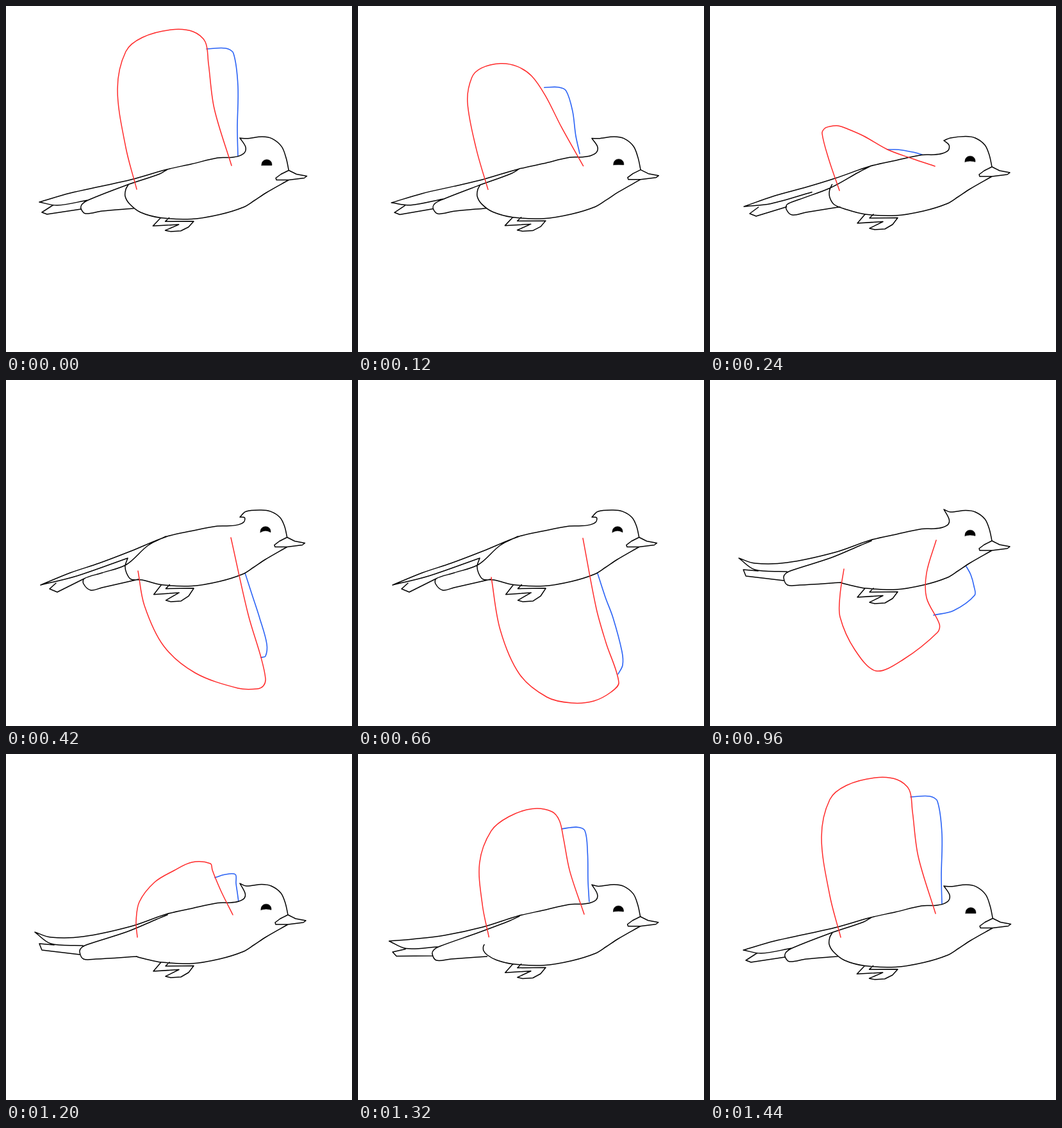
Animation of 540 by 540 pixels, one loop 1500 ms. Source, as an HTML page:

```html
<!DOCTYPE html>
<html lang="en">
<head>
<meta charset="utf-8">
<title>Bird flapping</title>
<style>
html, body { margin: 0; width: 100%; height: 100%; overflow: hidden; background: #fff; }
svg { display: block; width: 100vw; height: 100vh; }
path { fill: none; stroke: #000; stroke-width: 1.5; stroke-linecap: round; stroke-linejoin: round; }
</style>
</head>
<body>
<svg id="stage" viewBox="0 0 540 540"></svg>
<script>
const LOOP = 1500, STEP = 60;

const points = s => s.split(" ").map(p => p.split(",").map(Number));
const shape = parts => Object.fromEntries(Object.entries(parts).map(([k, s]) => [k, points(s)]));

// The body keeps one shape and only bobs, see warp()
const body = shape({
  back: "250,250 290,241 330,232.5 350,232 363,230 372,225 373,217",
  head: "375,206 399,203.5 414,206 429,217 436,233 440,251",
  beak: "440,251 452,257 468,260 464,263 440,266 421,266 420,263 428,257 440,251",
  belly: "440,266 405,286 387,298 370,308.5 333,320 290,327 242,325",
  feet: "242,325 230,339 270,336.5 249,347 257,349 273,348 285,341 293,330.5 249,331 255,325"
});

// sway holds the bob and the height of the crest tip
const down = shape({
  sway: "1,206",
  top: "52,306 100,292 150,281 195,271",
  under: "52,306 80,311 128,303",
  fork: "73,311 56,322 64,325 117,317",
  rear: "210,322 193,309 186,297 187,286 191,279",
  rump: "252,255 240,262 187,280 128,303 119,309 117,316 124,324 150,320 199,316"
});
const up = shape({
  sway: "-1,214",
  top: "54,320 100,301 145,286 195,267",
  under: "54,320 110,306 190,278",
  fork: "78,317 68,326 80,331 122,310",
  rear: "212,312 195,311 188,301 186,290 190,278",
  rump: "250,244 222,258 188,288 150,301 122,310 121,318 132,328 150,324 207,311"
});
const curled = shape({
  sway: "0,202",
  top: "45,278 70,286 120,285 195,269",
  under: "45,278 70,296 120,299",
  fork: "75,298 52,296 56,306 115,313",
  rear: "222,321 210,318 206,317 204,316 203,316",
  rump: "252,251 235,258 190,277 128,297 118,302 115,309 121,320 140,320 204,316"
});
const tailKeys = [[0, down], [60, down], [420, up], [660, up], [960, curled], [1200, curled], [1440, down]];

const wing = (near, far) => shape({ near, far });
const raised = wing(
  "204,286 187,221 174,130 187,71 213,49 258,37 292,40 311,56 316,90 325,160 352,249",
  "313,67 343,66 355,74 362,125 361,190 362,235");
const wingKeys = [
  [0, raised],
  [240, wing(
    "202,288 185,238 175,199 179,191 187,188 200,187 215,192 240,203 277,224 315,238 351,250",
    "277,224 289,224 300,225 311,227 321,229 331,232")],
  [420, wing(
    "206,298 216,352 246,415 295,457 362,481 392,482 402,477 405,466 398,433 378,366 351,246",
    "398,433 405,431 407,412 396,372 384,335 372,298")],
  [660, wing(
    "208,308 222,390 252,459 295,495 333,504 368,501 395,487 407,472 387,410 372,357 351,247",
    "406,459 413,445 412,424 398,371 386,339 373,299")],
  [960, wing(
    "209,295 203,335 203,370 226,421 259,454 302,436 355,394 358,381 338,340 338,301 353,250",
    "349,367 380,360 413,336 412,322 407,304 400,291")],
  [1200, wing(
    "205,286 203,262 208,231 232,200 262,182 290,169 319,171 322,181 327,194 337,217 354,251",
    "326,193 342,188 358,188 359,202 361,216 363,231")],
  [1440, raised]
];

// Hermite blend between poses; swing carries momentum through a key
function poseAt(keys, t, swing) {
  let i = 0;
  while (i < keys.length - 2 && t >= keys[i + 1][0]) i++;
  const [t0, a] = keys[i], [t1, b] = keys[i + 1];
  const span = t1 - t0, k = Math.min(1, (t - t0) / span);
  const ease = k * k * (3 - 2 * k);
  const speed = (n, part, j, c) => {
    const p = keys[n - 1], q = keys[n + 1];
    return p && q ? swing * span * (q[1][part][j][c] - p[1][part][j][c]) / (q[0] - p[0]) : 0;
  };
  const blend = (part, j, c, v) => v + (b[part][j][c] - v) * ease
    + k * (1 - k) * ((1 - k) * speed(i, part, j, c) - k * speed(i + 1, part, j, c));
  return Object.fromEntries(Object.keys(a).map(part =>
    [part, a[part].map((p, j) => p.map((v, c) => blend(part, j, c, v)))]));
}

// The trunk moves fully, crown and toes lag behind
function warp([x, y], bob) {
  const weight = Math.min(1, (y - 200) / 40, (370 - y) / 40);
  return [x + bob * (x - 300) / 110, y + 5.5 * bob * weight];
}

const line = pts => "M" + pts.join("L");
const dist = (a, b) => Math.hypot(a[0] - b[0], a[1] - b[1]);

// Spline through the points, tolerant of uneven spacing
function curve(pts) {
  let d = "M" + pts[0];
  for (let i = 0; i < pts.length - 1; i++) {
    const a = pts[i], b = pts[i + 1], before = pts[i - 1] || a, after = pts[i + 2] || b;
    const len = dist(a, b);
    const k1 = len / (dist(before, a) + len || 1) / 3;
    const k2 = len / (len + dist(b, after) || 1) / 3;
    const c1 = a.map((v, c) => v + (b[c] - before[c]) * k1);
    const c2 = b.map((v, c) => v - (after[c] - a[c]) * k2);
    d += `C${c1} ${c2} ${b}`;
  }
  return d;
}

const stage = document.getElementById("stage");
function addPath(style) {
  const el = document.createElementNS("http://www.w3.org/2000/svg", "path");
  Object.assign(el.style, style);
  stage.appendChild(el);
  return d => el.setAttribute("d", d);
}

const drawFar = addPath({ stroke: "#2a62f5", strokeWidth: 1.6 });
const drawFill = addPath({ fill: "#fff", stroke: "none" });
const drawInk = addPath({});
const drawEye = addPath({ fill: "#000", strokeWidth: 0.6 });
const drawNear = addPath({ stroke: "#ff2a2a", strokeWidth: 1.5 });

function draw(t) {
  const tail = poseAt(tailKeys, t, 0), wings = poseAt(wingKeys, t, 0.7);
  const [bob, crest] = tail.sway[0];
  const place = pts => pts.map(p => warp(p, bob));

  const tip = [365, crest];
  const back = [...tail.top, ...place(body.back), tip];
  const head = [tip, ...place(body.head)];
  const belly = [...place(body.belly), ...tail.rear];

  drawFar(curve(wings.far));
  drawFill(line([...back.slice(4), ...head, ...belly]));
  drawInk([back, head, belly, tail.rump, tail.under].map(curve).join("") +
    [place(body.beak), tail.fork, place(body.feet)].map(line).join(""));

  const [x, y] = warp([406, 243.2], bob);
  drawEye(`M${x - 8},${y}c-1,-12 17,-12 16,0q-8,${2.5 * bob - 2.5} -16,0z`);
  drawNear(curve(wings.near));
}

function tick() {
  const t = performance.now() % LOOP;
  draw(Math.floor(t / STEP) * STEP);
  requestAnimationFrame(tick);
}
tick();
</script>
</body>
</html>
```
